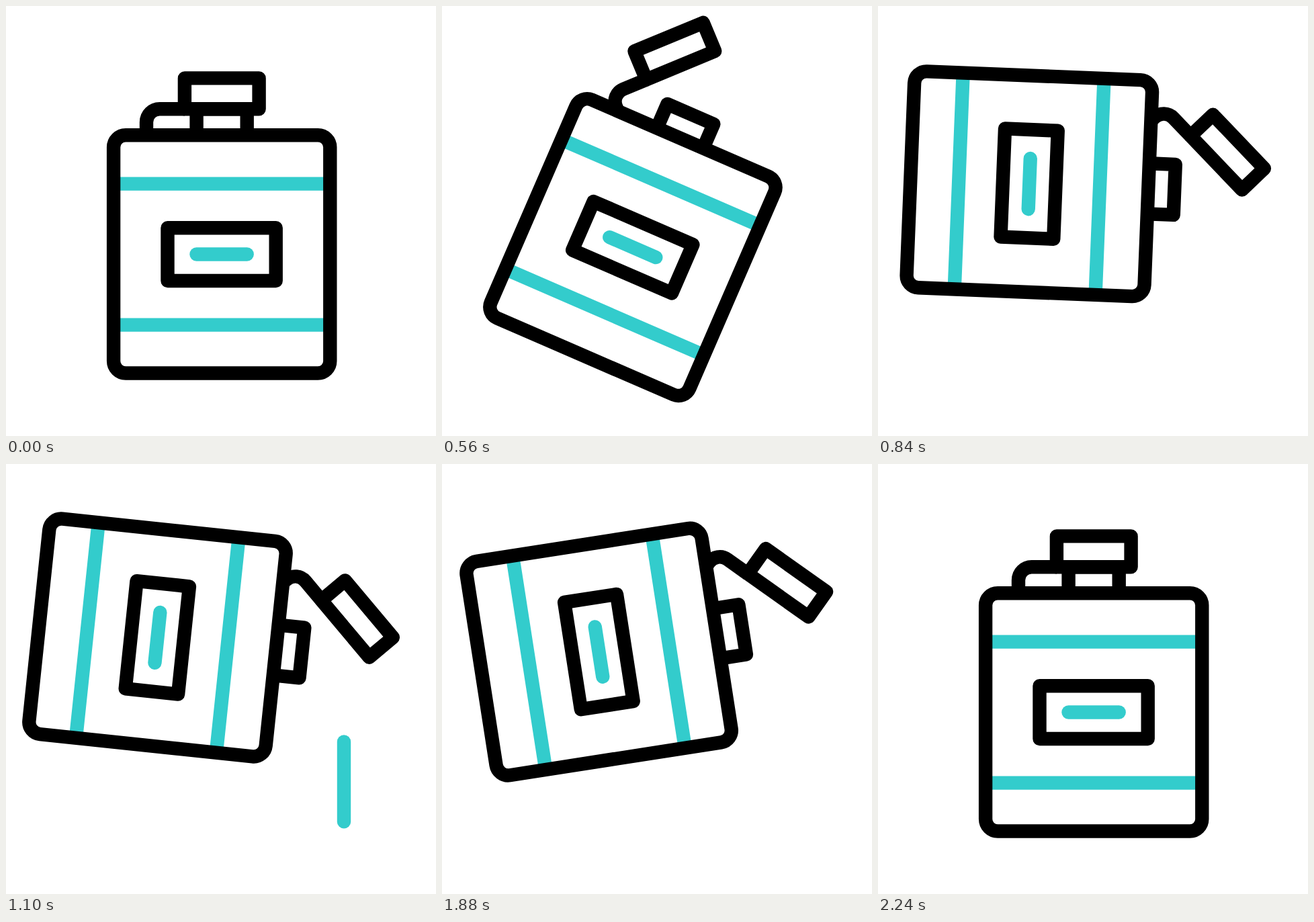
An HTML page for the animation above (2.4 s loop, 640 by 640 pixels).

```html
<!DOCTYPE html>
<html lang="en">
<head>
<meta charset="utf-8">
<title>Pouring flask</title>
<style>
  html, body { margin: 0; width: 100%; height: 100%; overflow: hidden; background: #fff; }
  svg { display: block; width: 100vw; height: 100vh; }
  .ink, .teal { fill: none; stroke-width: 20.4; stroke-linejoin: round; }
  .ink { stroke: #000; }
  .teal { stroke: #33cccc; }
  .round { stroke-linecap: round; }
</style>
</head>
<body>
<svg viewBox="0 0 640 640">
  <g id="flask">
    <path class="teal" d="M165 264.6H478M165 474.6H478"/>
    <path class="teal round" d="M283.5 369.5H358.7"/>
    <g class="ink">
      <path d="M283.6 192V153.3H358.7V192"/>
      <g id="cap">
        <path d="M209 184V173A19.7 19.7 0 0 1 228.7 153.3H266"/>
        <rect x="265.9" y="107.4" width="110.7" height="45.9"/>
      </g>
      <rect x="160.1" y="192.3" width="322.2" height="354.2" rx="18"/>
      <rect x="240.5" y="330.2" width="161.2" height="78.8"/>
    </g>
  </g>
  <g class="teal round">
    <path id="stem" pathLength="1" d="M503 413.5V561"/>
    <path class="barb" pathLength="1" d="M503 561C493 533 484 515 464 507"/>
    <path class="barb" pathLength="1" d="M503 561C513 533 522 515 542 507"/>
  </g>
</svg>
<script>
  const LOOP = 2400;
  const TILT = 96, CAP_OPEN = -46;
  const CENTER = { x: 321.2, y: 369.5 };
  const REACH = { x: -95.8, y: -111 };   // shift of the centre at full tilt
  const ARM_OUT = 89.7, ARM_BACK = 45.4; // how wide the path bows each way

  const flask = document.getElementById('flask');
  const cap = document.getElementById('cap');
  const stem = document.getElementById('stem');
  const barbs = document.querySelectorAll('.barb');

  // Smooth 0..1 between two times
  function ease(t, from, to) {
    const u = Math.min(1, Math.max(0, (t - from) / (to - from)));
    return u * u * (3 - 2 * u);
  }

  // Movement of the end of a hanging arm turned by an angle
  function swing(arm, degrees) {
    const a = degrees * Math.PI / 180;
    return { x: -arm * Math.sin(a), y: arm * (Math.cos(a) - 1) };
  }

  function trim(path, amount) {
    path.style.visibility = amount > 0 ? 'visible' : 'hidden';
    path.style.strokeDasharray = amount < 1 ? amount + ' 2' : 'none';
  }

  function draw(t) {
    const turn = ease(t, 400, 900) - ease(t, 1763, 2238);
    const open = ease(t, 100, 400) - ease(t, 1870, 2170);
    const angle = TILT * turn;

    // Swing on the arm plus a straight slide that completes the reach
    const arm = t < 1400 ? ARM_OUT : ARM_BACK;
    const now = swing(arm, angle), full = swing(arm, TILT);
    const shift = k => now[k] + turn * (REACH[k] - full[k]);
    flask.setAttribute('transform',
      `translate(${shift('x')} ${shift('y')}) rotate(${angle} ${CENTER.x} ${CENTER.y})`);
    cap.setAttribute('transform', `rotate(${CAP_OPEN * open} 228.7 173)`);

    trim(stem, ease(t, 900, 1180) - ease(t, 1520, 1760));
    const spread = ease(t, 1120, 1380) - ease(t, 1420, 1600);
    barbs.forEach(barb => trim(barb, spread));
  }

  const start = performance.now();
  function tick() {
    draw((performance.now() - start) % LOOP);
    requestAnimationFrame(tick);
  }
  draw(0);
  requestAnimationFrame(tick);
</script>
</body>
</html>
```
